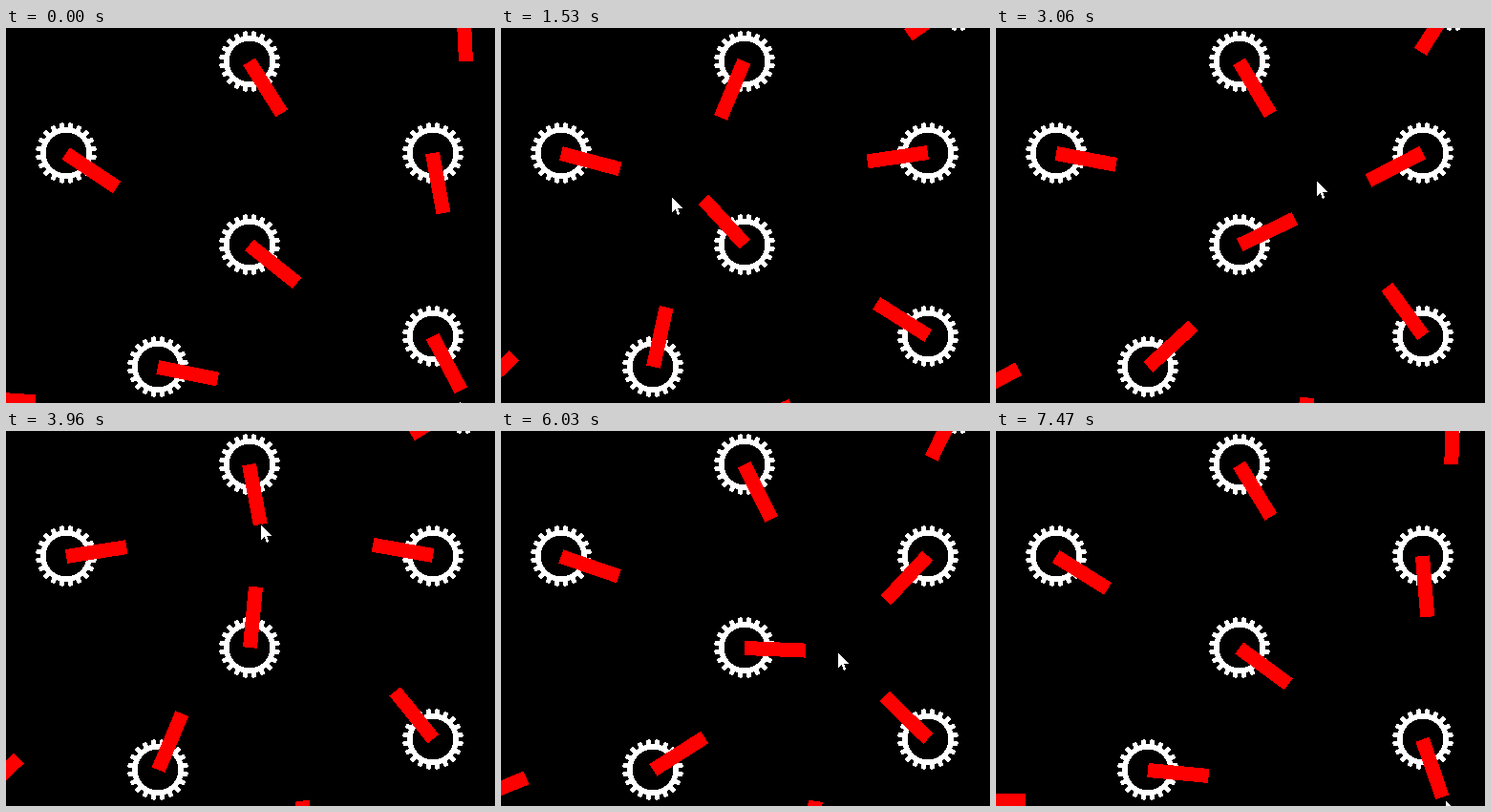
An HTML page that plays this animation: 512 by 393 pixels, repeating every 7560 ms.

```html
<!DOCTYPE html>
<html>
<head>
<meta charset="utf-8">
<style>
html, body { margin: 0; height: 100%; overflow: hidden; background: #000; }
svg { display: block; shape-rendering: crispEdges; fill: #fff; }
</style>
</head>
<body>
<svg id="stage" width="512" height="393"></svg>
<script>
const stage = document.getElementById('stage');
const STEP = 90, STEPS = 84, TEETH = 20;

// Gear centres in cells of a 32 px grid
const cells = [[8, 1], [2, 4], [14, 4], [8, 7], [5, 11], [14, 10], [15, -1], [-1, 12], [10, 14]];

// Key points of the pointer's path: step, x, y
const path = [
  [0, 500, 423], [4, 405, 305], [8, 354, 231], [9, 354, 228],
  [13, 310, 150], [19, 168, 190], [26, 257, 304], [27, 269, 306],
  [33, 345, 205], [37, 315, 125], [44, 267, 99], [45, 267, 99],
  [50, 198, 62], [55, 185, 139], [60, 215, 262], [67, 353.5, 231],
  [68, 353, 233], [75, 390, 275], [83, 468, 384], [84, 471, 388]
];

function add(tag, attrs) {
  const node = document.createElementNS('http://www.w3.org/2000/svg', tag);
  for (const name in attrs) node.setAttribute(name, attrs[name]);
  return stage.appendChild(node);
}

function slope(i, axis) {
  const a = path[Math.max(i - 1, 0)], b = path[Math.min(i + 1, path.length - 1)];
  return (b[axis] - a[axis]) / (b[0] - a[0]);
}

// Smooth cubic curve through the key points
function pointerAt(step) {
  let i = 0;
  while (i < path.length - 2 && path[i + 1][0] <= step) i++;
  const p = path[i], q = path[i + 1], span = q[0] - p[0];
  const u = (step - p[0]) / span, v = 1 - u;
  return [1, 2].map(k =>
    v * v * (1 + 2 * u) * p[k] + u * u * (3 - 2 * u) * q[k] +
    span * u * v * (v * slope(i, k) - u * slope(i + 1, k)));
}

function gearPath() {
  const points = [], pitch = 2 * Math.PI / TEETH;
  for (let i = 0; i < TEETH; i++) {
    for (const [offset, r] of [[-.33, 27], [-.23, 32], [.23, 32], [.33, 27]]) {
      const a = (i + .5 + offset) * pitch;
      points.push([r * Math.cos(a), r * Math.sin(a)]);
    }
  }
  return `M${points.join('L')}ZM21.5 0A21.5 21.5 0 1 0 -21.5 0A21.5 21.5 0 1 0 21.5 0Z`;
}

const outline = gearPath();
const bars = cells.map(([col, row]) => {
  const x = col * 32 - 1, y = row * 32 + 3;
  add('path', { d: outline, 'fill-rule': 'evenodd', transform: `translate(${x} ${y})` });
  return { x, y, node: add('rect', { y: -7, width: 64, height: 15, fill: '#f00' }) };
});
const arrow = add('path', {
  d: 'M0 0V15L3.5 12L6 18L8.5 17L6 11H11Z',
  stroke: '#000', 'stroke-width': 2, 'paint-order': 'stroke'
});

function frame() {
  const step = Math.floor(performance.now() / STEP) % STEPS;
  const [aimX, aimY] = pointerAt(step);
  for (const { x, y, node } of bars) {
    const angle = Math.atan2(aimY - y, aimX - x) * 180 / Math.PI;
    node.setAttribute('transform', `translate(${x} ${y}) rotate(${angle})`);
  }
  // The bars trail the pointer by one step
  const tip = pointerAt(step + 1).map(Math.round);
  arrow.setAttribute('transform', `translate(${tip})`);
  requestAnimationFrame(frame);
}
frame();
</script>
</body>
</html>
```
